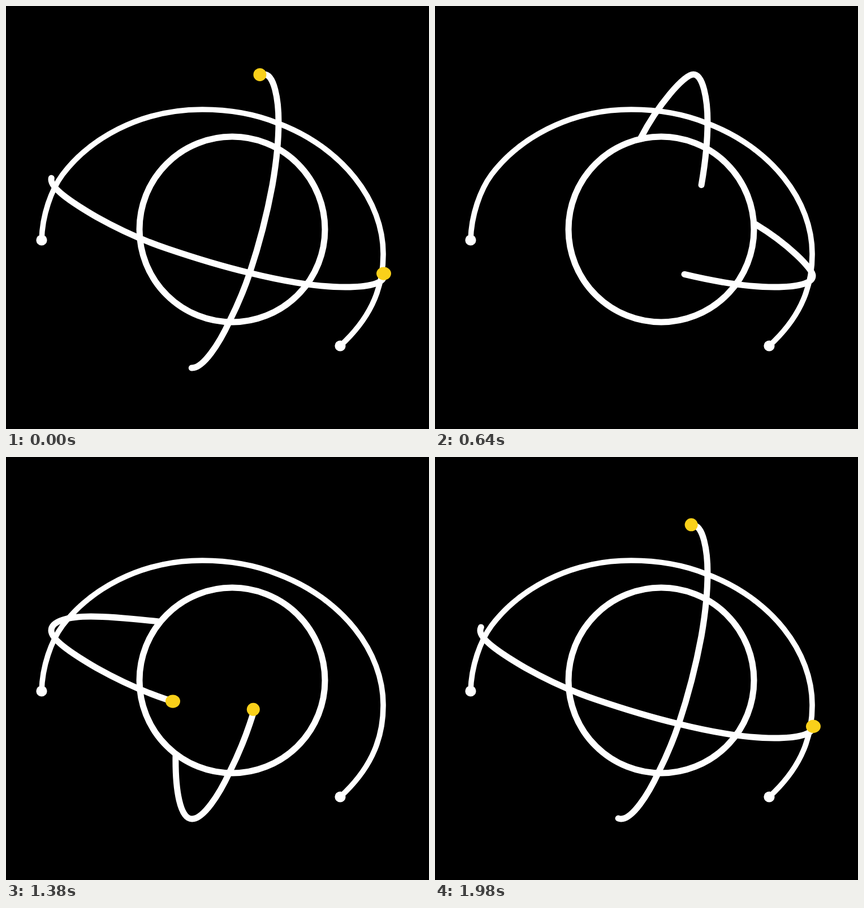
An HTML page without scripts that plays this animation: 748x748 px, repeating every 2000 ms.

```html
<!DOCTYPE html>
<html lang="en">
<head>
<meta charset="utf-8">
<title>Orbits</title>
<style>
  html, body { margin: 0; width: 100%; height: 100%; overflow: hidden; background: #000; }
  svg { display: block; width: 100vw; height: 100vh; }
  .line { fill: none; stroke: #fff; stroke-width: 11; stroke-linecap: round; }
  .arc { stroke-width: 9.6; }
  .end { fill: #fff; }
  .dot { fill: #f9d01a; }
</style>
</head>
<body>
<svg viewBox="0 0 748 748">
  <!-- planet and outer arc -->
  <circle class="line" cx="400" cy="395" r="164"/>
  <path class="line arc" d="M63 414C64 370 80 325 100 298C147 236 235 183 347 183C393 183 438 190 480 207C595 250 668 345 667 440C667 505 640 556 591 601"/>
  <circle class="end" cx="63" cy="414" r="9.6"/>
  <circle class="end" cx="591" cy="601" r="9.6"/>

  <!-- orbit trails: one dash travels along each path -->
  <path id="wide" class="line" stroke-dasharray="650 643" stroke-dashoffset="-197"
    d="M270 291C225 286 180 282 150 282C110 282 80 290 80 307C80 322 112 345 160 373C210 401 255 419 285 429C335 446 385 461 431 472C500 489 555 497 600 497C640 497 668 491 668 477C668 465 625 421 567 386">
    <animate attributeName="stroke-dashoffset" dur="2s" repeatCount="indefinite"
      keyTimes="0;.09;.32;.45;.6;.79;.99;1"
      values="-197;-306;-605;-782;-976;-1226;-1487;-1490"/>
  </path>
  <path id="tall" class="line" stroke-dasharray="575 566" stroke-dashoffset="-122"
    d="M300 527C299 590 308 640 329 640C349 640 377 597 395 558C409 530 421 502 431 472C448 421 461 371 471 317C478 277 482 240 482 205C482 165 474 121 457 121C440 121 393 177 364 233">
    <animate attributeName="stroke-dashoffset" dur="2s" repeatCount="indefinite"
      keyTimes="0;.09;.32;.45;.6;.79;.99;1"
      values="-122;-221;-485;-640;-813;-1030;-1259;-1263"/>
  </path>

  <!-- leading dots, hidden between passes -->
  <ellipse class="dot" cx="1" rx="13" ry="11.6">
    <animateMotion dur="2s" repeatCount="indefinite" calcMode="linear"
      keyTimes="0;.09;.109;.348;.45;.6;.79;.99;1"
      keyPoints=".863;.9745;1;0;.142;.342;.594;.86;.863">
      <mpath href="#wide"/>
    </animateMotion>
    <animate attributeName="opacity" dur="2s" repeatCount="indefinite" calcMode="discrete"
      keyTimes="0;.109;.348" values="1;0;1"/>
  </ellipse>
  <circle class="dot" cx="-1.5" cy="-1.5" r="11.5">
    <animateMotion dur="2s" repeatCount="indefinite" calcMode="linear"
      keyTimes="0;.09;.1275;.388;.45;.6;.79;.99;1"
      keyPoints=".831;.949;1;0;.088;.295;.553;.826;.831">
      <mpath href="#tall"/>
    </animateMotion>
    <animate attributeName="opacity" dur="2s" repeatCount="indefinite" calcMode="discrete"
      keyTimes="0;.1275;.388" values="1;0;1"/>
  </circle>
</svg>
</body>
</html>
```
